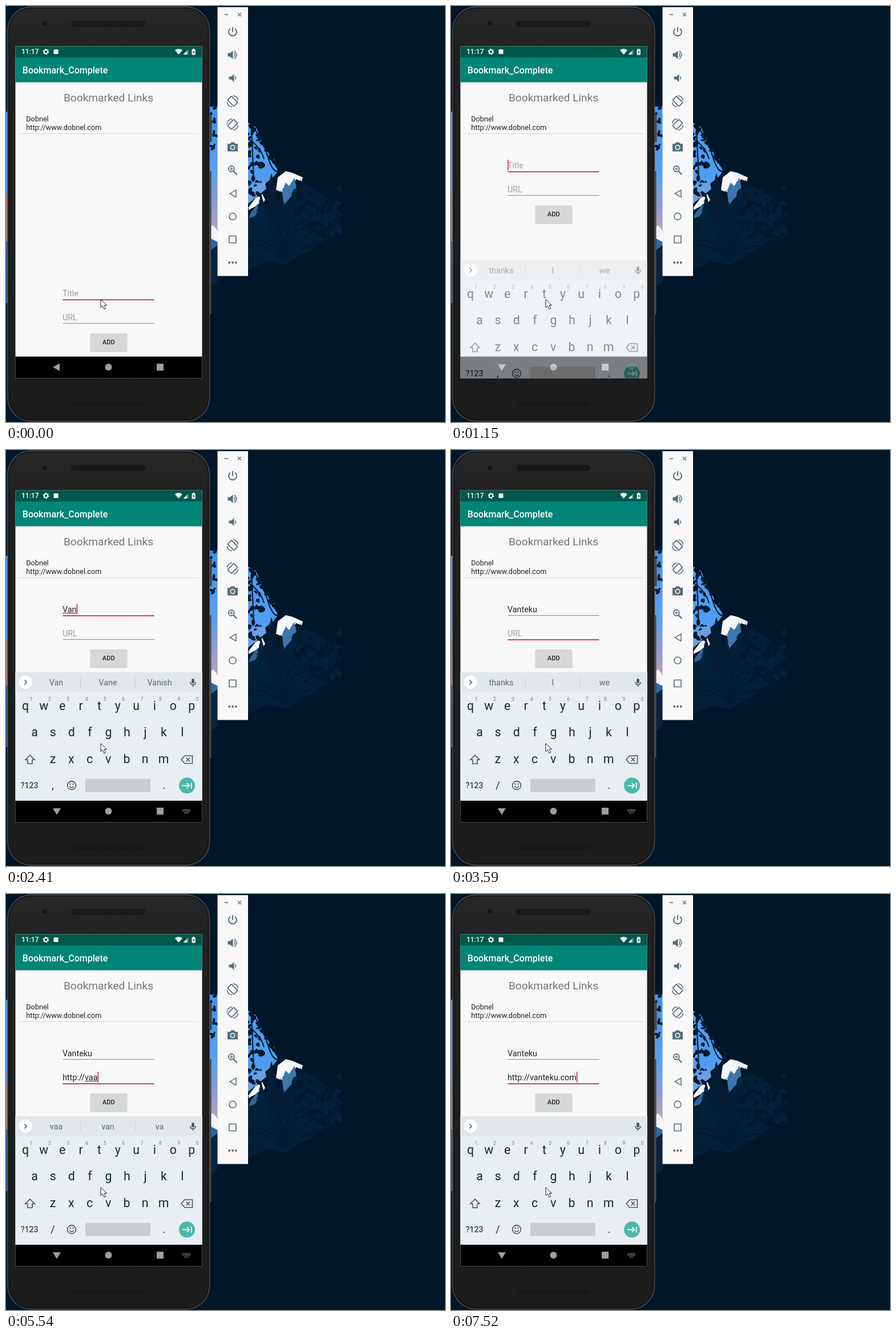
An HTML page that plays this animation: 769x728 px, repeating every 8 s.

```html
<!DOCTYPE html>
<html lang="en">
<head>
<meta charset="utf-8">
<title>Bookmarks demo</title>
<style>
html, body { margin: 0; width: 100%; height: 100%; overflow: hidden; background: #001629; }
svg { display: block; width: 769px; height: 728px; font-family: Roboto, sans-serif; }
.mid { text-anchor: middle; }
.medium { font-weight: 500; }
.field { font-size: 14.3px; fill: #222; }
.hint { fill: #a0a0a0; }
.icons { fill: none; stroke: #546e7a; stroke-width: 1.8; }
.icons .solid { fill: #546e7a; stroke: none; }
.keys { font-size: 21.3px; fill: #142a35; text-anchor: middle; }
.keys .small { font-size: 18px; }
.digits { font-size: 8.5px; fill: #74828a; text-anchor: middle; }
.words { font-size: 14.3px; fill: #5d6b73; text-anchor: middle; }
.line { fill: none; stroke: #45565f; stroke-width: 1.6; }
</style>
</head>
<body>
<svg viewBox="0 0 769 728">
  <defs>
    <clipPath id="screenClip"><path d="M16.500 70.500h327v581h-327z"/></clipPath>
    <linearGradient id="dusk" x1="0" y1="0" x2="0" y2="1">
      <stop offset="0" stop-color="#3f91ee"/><stop offset=".55" stop-color="#5aa0ee"/>
      <stop offset=".8" stop-color="#8f9bd0"/><stop offset="1" stop-color="#b7a3bd"/>
    </linearGradient>
    <linearGradient id="body" x1="0" y1="0" x2="0" y2="1">
      <stop offset="0" stop-color="#282828"/><stop offset=".12" stop-color="#202020"/><stop offset="1" stop-color="#1c1c1c"/>
    </linearGradient>
    <pattern id="mesh" width="4" height="4" patternUnits="userSpaceOnUse">
      <path d="M0 0h4v4H0z" fill="#222"/><path d="M0 0h2v2H0zM2 2h2v2H2z" fill="#0e0e0e"/>
    </pattern>
  </defs>

  <g id="wallpaper">
    <path d="M0 0h769v728H0z" fill="#001629"/>
    <path d="M0 185h3v145H0z" fill="#4a98ee"/>
    <path d="M0 330h3v82H0z" fill="#a8786c"/>
    <path d="M0 412h3v108H0z" fill="#2f5f9e"/>
    <path d="M355 176h16v216h-16z" fill="url(#dusk)"/>
    <path d="M355 388l8-4 8 10v22l-16-6z" fill="#f4f5fa"/>
    <path d="M355 405l16 8v24l-16 14z" fill="#2d69a8"/>
    <path d="M355 430l16-12v62l-7 10-9-4z" fill="#06233f"/>
    <path d="M424 204l14 8 10 22 14 20 17 31-10 14-20 16-25 30z" fill="#4f9df0"/>
    <path d="M424 318l18-8 10-8 4 18-32 26z" fill="#6b9fe3"/>
    <path d="M425 352l12-16 12-7 6 12-30 16z" fill="#f5f7fb"/>
    <path d="M476 300l14-11 12 3 18 8-2 7-10-4-7 12-14 12-14-5z" fill="#f5f7fb"/>
    <path d="M484 322l6-13 6 6 9-14 3 12 4 46-26 10z" fill="#3c76ac"/>
    <path d="M427 364l14-18 10 6 4 20-31 6z" fill="#2f659a"/>
    <path d="M424 372l22-8 14-16 20 8 24-28 18-16 24 10 14 12 20 14 10 18-9 13 9 12-16 8-10 10-14 4-14 14-21 10-26 16-32-6-33 15z" fill="#031f38"/>
  </g>

  <g id="phone">
    <path d="M357 190h3.500v48H357zM357 289h2.500v250H357z" fill="#454545"/>
    <rect x="3" y="1.500" width="353.500" height="725" rx="41" fill="url(#body)" stroke="#4c4f52" stroke-width="1.500"/>
    <rect x="5" y="3.500" width="349.500" height="721" rx="39" fill="none" stroke="#111" stroke-width="1.500"/>
    <circle cx="68" cy="31" r="4" fill="#15161b"/>
    <rect x="114" y="26" width="130" height="11" rx="5" fill="url(#mesh)"/>
    <rect x="117" y="691" width="128" height="10" rx="5" fill="url(#mesh)"/>
  </g>

  <g clip-path="url(#screenClip)">
    <path d="M16 70h328v582H16z" fill="#f8f8f8"/>
    <path d="M16 70h328v20H16z" fill="#00574b"/>
    <path d="M16 90h328v43.500H16z" fill="#008577"/>
    <path d="M16 613.500h328V652H16z"/>
    <g fill="#fff">
      <text class="medium" x="27" y="84.300" font-size="12">11:17</text>
      <circle cx="70" cy="80" r="3.200" fill="none" stroke="#fff" stroke-width="2"/>
      <circle cx="70" cy="80" r="4.500" fill="none" stroke="#fff" stroke-width="1.600" stroke-dasharray="2.1 2.61"/>
      <rect x="83.500" y="76" width="8" height="8" rx="1"/>
      <path d="M296 77.300q6.500-4.500 13 0l-6.500 7.700z"/>
      <path d="M310.500 85l9-9v9z" opacity=".4"/><path d="M310.500 85l6-6v6z"/>
      <path d="M325.500 76h1.700v-1.300h2.800v1.300h1.700v9.500h-6.200z"/>
      <path d="M329.200 77.500l-2.300 3.700h1.500v2.800l2.200-3.800h-1.400z" fill="#00574b"/>
      <text class="medium" x="28.800" y="118" font-size="16">Bookmark_Complete</text>
    </g>
    <text class="mid" x="179.500" y="167" font-size="19.100" fill="#757575">Bookmarked Links</text>
    <g font-size="12.650" fill="#202020">
      <text x="35.300" y="202">Dobnel</text>
      <text x="35.300" y="217">http://www.dobnel.com</text>
    </g>
    <path d="M22 223.500h315" stroke="#d6d6d6"/>

    <g id="form">
      <text class="field" x="99" y="508" id="title"></text>
      <text class="field" x="99" y="550" id="url"></text>
      <path id="titleLine" d="M99.500 514.200h160"/>
      <path id="urlLine" d="M99.500 556.200h160"/>
      <path id="mark" stroke="#333"/>
      <path id="caret" stroke="#d81b60" stroke-width="1.600"/>
      <rect x="147.500" y="574" width="65" height="31.500" rx="2" fill="#000" opacity=".16"/>
      <rect x="147.500" y="573" width="64.500" height="31" rx="1.500" fill="#d6d7d7"/>
      <text class="mid medium" x="179.800" y="592.400" font-size="11.100" fill="#202020">ADD</text>
    </g>

    <g fill="#9e9e9e">
      <path id="back"/>
      <circle cx="179.500" cy="632" r="6"/>
      <path d="M264 626h12v12h-12z"/>
      <path id="imeIcon" d="M309.500 629.500h13M309.500 632h13M312 635.200h8" stroke="#9e9e9e" stroke-width="1.500" stroke-dasharray="1.5 .8"/>
    </g>

    <g id="keyboard">
      <path d="M16 389h328v224.500H16z" fill="#e9eef1"/>
      <path d="M16 389h328v35H16z" fill="#e2e7ea"/>
      <circle cx="34.300" cy="407" r="12.300" fill="#c8ced2"/>
      <circle cx="34.300" cy="406.400" r="12" fill="#fff"/>
      <path class="line" d="M32.300 402.500l4 4-4 4"/>
      <path id="dividers" d="M130.500 397v20M226.500 397v20" stroke="#ccd3d7"/>
      <g class="words" id="words"><text x="88" y="412"/><text x="178.500" y="412"/><text x="269" y="412"/></g>
      <rect x="325.200" y="400" width="4.600" height="8.500" rx="2.300" fill="#45565f"/>
      <path class="line" d="M323 406q0 4.800 4.500 4.800t4.500-4.800M327.500 411v3" stroke-width="1.400"/>
      <g class="keys" id="keys"></g>
      <g class="digits" id="digits"></g>
      <path class="line" d="M42 534l-8 8h4v7h8v-7h4z"/>
      <path class="line" d="M313 535h13.500v13.500H313l-6-6.700zM315.500 538.500l6.500 6.500m0-6.500l-6.500 6.500"/>
      <text class="medium" x="25.800" y="592" font-size="14" fill="#33454e">?123</text>
      <circle class="line" cx="115" cy="587" r="7.400"/>
      <path class="line" d="M111.300 588.500q3.700 5 7.400 0"/>
      <path d="M111.500 583.500h2v2.200h-2zM116.500 583.500h2v2.200h-2z" fill="#45565f"/>
      <rect x="139" y="575.500" width="114" height="23" rx="2" fill="#c8cdd0"/>
      <circle cx="317" cy="587.300" r="14" fill="#4bb8ab"/>
      <path d="M309 587.300h12M317 583l4.300 4.300-4.300 4.300M324.800 582v10.600" fill="none" stroke="#fff" stroke-width="1.800"/>
    </g>
  </g>

  <path d="M166 513.500v14.300l3.300-3.100 2.600 6 2.700-1.200-2.600-5.800h4.500z" fill="#fff" stroke="#222"/>

  <path d="M370.500 2H424v470.500h-53.500z" fill="#f8f8f8"/>
  <g class="icons">
    <path d="M382.500 15h6.500M406 12l6 6m0-6l-6 6" stroke-width="1.300"/>
    <path d="M393 39.500a7 7 0 1 0 8 0M397 37v8.500" stroke-width="2"/>
    <path class="solid" d="M388.500 82.500h4l5-4.500v15l-5-4.500h-4zM390.500 123.500h4l5-4.500v14l-5-4.500h-4z"/>
    <path d="M399.500 82q3 3.500 0 7M400 78.500q8 7 0 14M401.500 123.500q2 2.500 0 5" stroke-width="1.500"/>
    <g id="rotate">
      <rect x="392.300" y="159" width="9.500" height="15.500" rx="1" transform="rotate(-45 397 166.700)"/>
      <path d="M398 157q8 1 8.500 8.500M396 176.500q-8-1-8.500-8.500" stroke-width="1.500"/>
    </g>
    <use href="#rotate" transform="translate(794 40.500) scale(-1 1)"/>
    <path class="solid" d="M388 241h4.500l2-2.500h5l2 2.500h4.500v13.500h-18z"/>
    <circle cx="397" cy="247.500" r="3.700" stroke="#f8f8f8" stroke-width="1.600"/>
    <circle cx="394.800" cy="285" r="5"/>
    <path d="M398.500 289l6 6" stroke-width="2.200"/><path d="M392 285h5.600M394.800 282.200v5.600" stroke-width="1.300"/>
    <path d="M403 322v12.500l-11-6.300z" stroke-width="1.500"/>
    <circle cx="397" cy="368.300" r="6" stroke-width="1.600"/>
    <path d="M391 402.500h12v12h-12z" stroke-width="1.600"/>
    <path d="M391.300 449h0M397 449h0M402.700 449h0" stroke-width="4" stroke-linecap="round"/>
  </g>
</svg>
<script>
const LOOP = 8000, RAISE = -224;
const $ = id => document.getElementById(id);
const add = (parent, tag, attrs, text = '') => {
  const node = document.createElementNS('http://www.w3.org/2000/svg', tag);
  for (const name in attrs) node.setAttribute(name, attrs[name]);
  node.textContent = text;
  return parent.appendChild(node);
};

// Forest: scattered leaves, firs and grass
let seed = 11;
const rnd = () => (seed = seed * 16807 % 2147483647) / 2147483647;
const land = $('wallpaper');
function leaf(x, y, size, fill) {
  add(land, 'ellipse', { cx: x, cy: y, rx: size, ry: size * .55, fill, transform: `rotate(${rnd() * 180} ${x} ${y})` });
}
function fir(x, top, bottom, spread, fill) {
  let left = '', right = '';
  for (let i = 1; i <= 9; i++) {
    const y = top + (bottom - top) * i / 9, w = spread * i / 9;
    right += `L${x + w} ${y}L${x + w * .6} ${y - 2}`;
    left = `L${x - w * .6} ${y - 2}L${x - w} ${y}` + left;
  }
  add(land, 'path', { d: `M${x} ${top}${right}${left}Z`, fill });
}
fir(465, 292, 385, 25, '#041d35');
fir(447, 328, 400, 20, '#04213c');
fir(482, 322, 400, 18, '#041d35');
fir(516, 303, 385, 20, '#031c34');
add(land, 'path', { d: 'M424 200Q448 228 458 262T480 288M424 232Q446 246 452 268M430 216L434 300', fill: 'none', stroke: '#001629', 'stroke-width': 2 });
for (let i = 0; i < 30; i++) {
  const p = rnd();
  leaf(424 + p * 56, 200 + p * 88 + (rnd() - .6) * 14, 2.5 + rnd() * 4, '#001629');
}
for (let i = 0; i < 38; i++) leaf(425 + rnd() ** 2 * 24, 222 + rnd() * 110, 2.5 + rnd() * 4, '#021a30');
for (let i = 0; i < 14; i++) leaf(357 + rnd() * 13, 172 + rnd() ** 2 * 80, 2.5 + rnd() * 3, '#021a30');
for (let i = 0; i < 80; i++) leaf(505 + rnd() * 83, 318 + rnd() * 86, 3 + rnd() * 5, i % 3 ? '#00182c' : '#04223d');
for (let i = 0; i < 34; i++) {
  const a = -2.95 + i / 34 * 2.8, r = 35 + rnd() * 32;
  const x = 487 + Math.cos(a) * r, y = 443 + Math.sin(a) * r;
  add(land, 'path', { d: `M487 445Q${487 + Math.cos(a) * r * .4} ${440 + Math.sin(a) * r * .8} ${x} ${y}`, fill: 'none', stroke: i % 2 ? '#001629' : '#042440', 'stroke-width': 1.4 });
}

// Keyboard letters
[['qwertyuiop', 34, 455], ['asdfghjkl', 50, 501], ['zxcvbnm', 82, 548]].forEach(([letters, x, y]) =>
  [...letters].forEach((letter, i) => add($('keys'), 'text', { x: x + i * 32.35, y }, letter)));
[...'1234567890'].forEach((digit, i) => add($('digits'), 'text', { x: 44 + i * 32.35, y: 439 }, digit));
add($('keys'), 'text', { x: 277, y: 592.5, class: 'small' }, '.');
const comma = add($('keys'), 'text', { x: 82, y: 592.5, class: 'small' });

// Each step holds until the next one; only changed values are listed.
const type = (at, field, text, mark, words) =>
  [at, { [field]: text, mark, caret: true, ...(words === undefined ? {} : { words }) }];
const changes = [
  [0, { title: '', url: '', focus: 'title', caret: false, mark: 0, words: 'thanks I we', up: false, kb: [0, 0], slash: false }],
  [120, { caret: true }],
  [1030, { up: true, kb: [.12, 96] }],
  [1150, { kb: [.53, 56] }],
  [1300, { kb: [1, 0] }],
  [1570, { caret: false }],
  type(2140, 'title', 'V', 1, 'V Very Via'),
  type(2270, 'title', 'Va', 2, 'Va Van Vary'),
  type(2410, 'title', 'Van', 3, 'Van Vane Vanish'),
  type(2560, 'title', 'Vant', 4, 'Vant Want Vantage'),
  type(2710, 'title', 'Vante', 5, 'Vante Wanted Vantage'),
  type(2860, 'title', 'Vanteku', 7, "Vanteku Vantekus Vanteku's"),
  [3160, { focus: 'url', mark: 0, slash: true }],
  [3280, { words: 'thanks I we' }],
  [3590, { caret: false }],
  type(3720, 'url', 'h', 1, 'h how have'),
  type(3860, 'url', 'ht', 2, 'ht the hot'),
  type(3990, 'url', 'htt', 3, 'htt http https'),
  type(4120, 'url', 'http', 4),
  [4250, { words: 'http https hope' }],
  type(4560, 'url', 'http:', 0, 'the I in'),
  type(4840, 'url', 'http:/', 0, ''),
  type(4960, 'url', 'http://', 0),
  type(5260, 'url', 'http://v', 1, 'v van very'),
  type(5400, 'url', 'http://va', 2, 'va van vary'),
  type(5540, 'url', 'http://vaa', 3, 'vaa van va'),
  [5970, { caret: false }],
  type(6250, 'url', 'http://va', 2, 'va van vary'),
  type(6370, 'url', 'http://van', 3, 'van vane vanish'),
  type(6670, 'url', 'http://vant', 4, 'vant want vantage'),
  type(6810, 'url', 'http://vante', 5, 'vante wanted vantage'),
  type(6950, 'url', 'http://vantek', 6, 'vantek vanteku vantage'),
  type(7090, 'url', 'http://vanteku', 7, "vanteku vantekus vanteku's"),
  type(7240, 'url', 'http://vanteku.', 0, ''),
  type(7380, 'url', 'http://vanteku.co', 0),
  type(7520, 'url', 'http://vanteku.com', 0)
];
let state = {};
const steps = changes.map(([at, change]) => ({ at, ...(state = { ...state, ...change }) }));

function render(s) {
  for (const [id, hint] of [['title', 'Title'], ['url', 'URL']]) {
    $(id).textContent = s[id] || hint;
    $(id).classList.toggle('hint', !s[id]);
    const active = s.focus === id, line = $(id + 'Line');
    line.setAttribute('stroke', active ? '#d81b60' : '#858585');
    line.setAttribute('stroke-width', active ? 1.7 : 1);
    line.setAttribute('transform', `translate(0 ${active ? 0 : -.7})`);
  }
  const text = s[s.focus], node = $(s.focus), baseline = s.focus === 'title' ? 508 : 550;
  const widthOf = count => count ? node.getSubStringLength(0, count) : 0;
  const end = 99 + widthOf(text.length), start = 99 + widthOf(text.length - s.mark);
  $('mark').setAttribute('d', s.mark ? `M${start} ${baseline + 1.5}H${end}` : '');
  $('caret').setAttribute('d', s.caret ? `M${end + .9} ${baseline - 15}v18.500` : '');
  $('form').setAttribute('transform', `translate(0 ${s.up ? RAISE : 0})`);

  const [opacity, shift] = s.kb, shown = opacity > .5;
  $('keyboard').setAttribute('opacity', opacity);
  $('keyboard').setAttribute('transform', `translate(0 ${shift})`);
  $('back').setAttribute('d', shown ? 'M82 627h14l-7 11.500z' : 'M82 632l12-6.500v13z');
  $('imeIcon').setAttribute('opacity', shown ? 1 : 0);
  comma.textContent = s.slash ? '/' : ',';
  const words = s.words.split(' ');
  [...$('words').children].forEach((slot, i) => slot.textContent = words[i] || '');
  $('dividers').setAttribute('opacity', s.words ? 1 : 0);
}

let shownStep;
const began = performance.now();
function frame() {
  const t = (performance.now() - began) % LOOP;
  const step = steps.findLast(s => s.at <= t);
  if (step !== shownStep) render(shownStep = step);
  requestAnimationFrame(frame);
}
frame();
</script>
</body>
</html>
```
